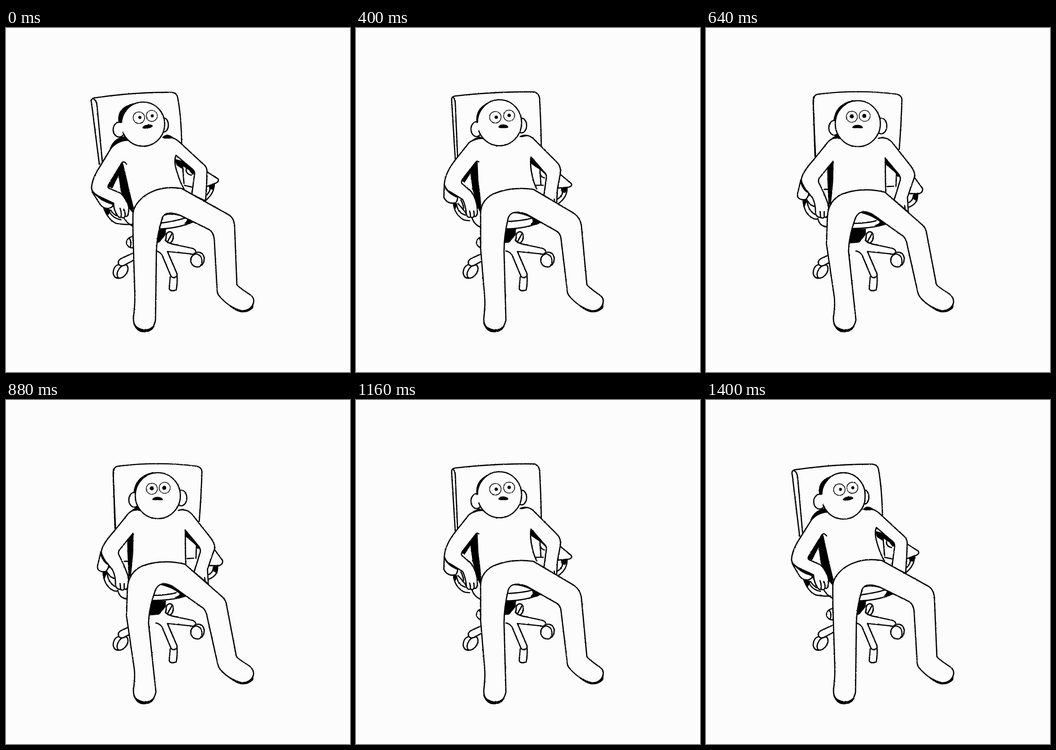
Write an HTML page that moves like this. It is 748 px wide and 748 px high and loops after 1520 ms.

```html
<!DOCTYPE html>
<html lang="en">
<head>
<meta charset="utf-8">
<title>Swivel chair</title>
<style>
html, body { margin: 0; width: 100%; height: 100%; overflow: hidden; background: #fcfcfc; }
svg { display: block; width: 100%; height: 100%; }
path { fill: #fcfcfc; stroke: #000; stroke-width: 2.7; stroke-linecap: round; stroke-linejoin: round; }
.line { fill: none; }
.ink { fill: #000; stroke-width: 1; }
.blank { stroke: none; }
.thin { stroke-width: 1.6; }
</style>
</head>
<body>
<svg viewBox="0 0 748 748">
  <filter id="rough" x="0" y="0" width="748" height="748" filterUnits="userSpaceOnUse" color-interpolation-filters="sRGB">
    <feTurbulence type="fractalNoise" baseFrequency=".35" numOctaves="2" seed="4"/>
    <feDisplacementMap in="SourceGraphic" scale="2.2" xChannelSelector="R" yChannelSelector="G"/>
  </filter>
  <g id="art" filter="url(#rough)"></g>
</svg>
<script>
const art = document.getElementById('art');
const moving = [];

// One path: a single outline stays still; three are poses turned left, halfway and front.
function part(style, ...poses) {
  const path = document.createElementNS('http://www.w3.org/2000/svg', 'path');
  path.setAttribute('class', style);
  path.setAttribute('d', poses[0]);
  art.append(path);
  if (poses.length > 1) {
    const values = poses.map(d => d.match(/-?[\d.]+/g).map(Number));
    moving.push({ path, values, shape: poses[0] });
  }
}

const oval = (x, y, rx, ry = rx) =>
  `M${x - rx} ${y} a${rx} ${ry} 0 1 0 ${2 * rx} 0 a${rx} ${ry} 0 1 0 ${-2 * rx} 0`;
const ovals = (style, ...poses) => part(style, ...poses.map(p => oval(...p)));

// Wheels and base
part('', 'M278 453 Q262 455 262 468 Q265 479 278 478 M268 457 Q274 465 270 477');
part('', 'M350 446 Q358 439 363 448 Q366 460 357 468 Q346 467 348 456 Q348 450 350 446 M361 447 L351 465');
part('ink', 'M313 437 L347 437 L347 449 Q341 457 333 466 L312 468 Z');
part('', 'M248 514 Q234 515 233 533 Q235 545 246 544 Q239 540 243 529 Q249 515 262 515 Q268 521 263 532 Q256 544 246 544');
part('', 'M279 488 L249 502 Q241 508 246 515 Q250 519 257 516 L279 504');
part('', 'M413 488 Q428 485 431 500 Q431 514 421 519 Q407 522 402 509 Q400 495 413 491 Q427 494 426 509 Q425 516 421 519');
part('', 'M357 541 L355 567 Q357 572 363 571 L370 570 Q373 556 372 539');
part('', 'M346 461 Q350 468 372 472 L405 479 Q414 482 412 488 Q408 494 401 491 L351 486 L370 530 Q375 539 368 542 Q361 545 358 538 L342 500 Q338 487 326 485');

// Chair back and seat
part('',
  'M203 297 L186 163 Q183 154 192 152 Q280 139 361 140 Q371 141 373 150 Q381 190 382 252',
  'M216 288 L208 158 Q207 149 215 148 Q300 138 388 139 Q398 143 399 152 Q402 200 403 260',
  'M237 280 L233 158 Q233 146 243 144 Q330 133 415 144 Q426 147 426 157 Q424 215 420 264');
part('line',
  'M190 154 Q197 157 198 170 L210 297',
  'M211 150 Q216 155 216 166 L221 283',
  'M235 151 Q233 156 233 164 L238 280');
part('',
  'M256 412 Q262 424 276 431 L330 437 Q375 436 408 421 L380 390 L280 380',
  'M252 412 Q256 426 270 433 L325 437 Q370 436 400 423 L370 390 L280 380',
  'M243 414 Q247 432 263 432 L316 436 Q360 436 392 426 L360 390 L280 380');
part('line',
  'M330 425 Q365 421 390 413',
  'M322 421 Q360 420 384 413',
  'M312 425 Q350 425 370 419');
part('ink',
  'M343 405 Q360 397 378 405 L411 420 Q398 426 388 425 Q396 418 394 414 Q362 400 343 408 Z',
  'M340 400 Q352 397 371 403 L401 423 Q392 430 380 427 Q388 421 382 413 Q362 402 340 402 Z',
  'M338 400 Q348 398 362 404 L393 426 Q380 430 368 429 Q379 425 378 421 Q362 408 338 402 Z');

// Right armrest
part('line',
  'M453 338 Q453 360 434 375 M445 343 Q444 358 434 365',
  'M459 348 Q459 370 438 383 M450 351 Q450 366 438 372',
  'M460 361 Q462 382 440 390 M451 364 Q450 376 440 380');
part('ink',
  'M441 341 L454 337 L450 351 L443 350 Z',
  'M446 348 L460 346 L455 358 L448 357 Z',
  'M451 362 L461 360 L459 377 L452 372 Z');
part('',
  'M436 312 L461 328 Q464 333 457 337 L436 345',
  'M444 318 L468 338 Q471 344 463 346 L440 348',
  'M454 326 L471 349 Q472 357 464 360 L440 360');

// Left armrest
part('line',
  'M212 390 Q222 418 240 425 Q258 428 274 427 M224 398 Q232 414 250 417',
  'M212 382 Q214 405 234 417 Q240 419 247 419 M219 385 Q222 402 238 407',
  'M211 375 Q213 405 235 415 Q239 416 243 415 M220 378 Q223 398 238 406');
part('ink',
  'M211 388 L228 396 L221 409 Z',
  'M211 381 L220 382 L215 396 Z',
  'M211 374 L221 373 L214 388 Z');
part('line',
  'M232 386 Q238 392 240 404 M228 396 Q232 404 240 408',
  'M228 374 Q232 380 234 392 M222 382 Q230 390 240 404',
  'M224 364 Q231 362 236 376 M221 376 Q228 388 238 388');
part('',
  'M187 356 L205 384 Q213 394 224 392 Q234 390 233 380 Q205 372 187 356',
  'M192 342 L191 368 Q198 384 217 380 Q224 371 218 362 Q200 356 192 342',
  'M206 331 L199 360 Q197 375 217 373 Q226 363 222 354 Q210 345 206 331');
part('ink',
  'M186 353 Q205 370 234 380 L232 384 Q203 377 186 353',
  'M191 342 Q197 355 222 366 L219 368 Q197 360 191 342',
  'M205 330 Q208 342 222 357 L220 358 Q206 348 205 330');

// Gaps between arms and torso
part('line',
  'M240 362 L248 362',
  'M238 360 L250 360',
  'M257 351 L265 351');
part('ink',
  'M251 293 L222 345 L231 348 L245 320 L250 355 L264 388 L276 402 L275 380 L264 330 Z',
  'M262 290 L229 331 L236 336 L249 315 L254 352 L266 392 L272 405 L271 370 L265 330 Z',
  'M276 290 L264 303 L264 304 L264 315 L265 345 L266 370 L267 386 L272 372 L275 330 Z');
part('line',
  'M384 302 L387 338 M387 342 L404 346 M392 306 Q390 317 403 320',
  'M400 310 L402 340 M391 342 L407 342 M402 320 Q404 325 410 326',
  'M414 318 L413 344 M393 345 L408 344 M414 320 Q416 322 420 322');
part('ink',
  'M366 285 L385 290 L411 311 L406 319 L398 309 L385 300 L385 307 L371 298 Z',
  'M379 283 L396 295 L414 316 L414 321 L404 311 L398 307 L394 304 L381 295 Z',
  'M389 283 L405 301 L423 320 L423 326 L414 317 L408 311 L402 306 L390 296 Z');

// Torso
part('blank',
  'M253 293 L279 395 L392 356 L368 290 L375 246 L345 238 L266 244 L228 262',
  'M263 290 L272 390 L393 352 L380 290 L385 240 L357 236 L276 240 L246 249',
  'M276 290 L271 385 L391 358 L390 285 L405 249 L375 240 L290 240 L265 248');
part('line',
  'M253 293 L263 335 Q269 368 277 392 M370 276 Q364 288 371 310 Q378 335 387 350',
  'M263 290 L265 335 Q269 360 271 385 M381 279 Q378 290 381 310 Q385 335 393 350',
  'M276 290 L275 335 Q273 360 270 385 M390 283 Q390 295 390 310 Q390 340 391 357');

// Arms and fingers
part('',
  'M266 244 Q243 244 228 262 L202 305 Q186 330 186 349 Q187 357 200 365 L234 381 Q234 396 242 407 Q246 414 250 411 Q256 415 259 409 Q265 412 266 402 Q269 390 264 380 Q255 364 249 359 L225 349 Q220 347 223 341 L252 293 Q257 288 262 296',
  'M276 240 Q258 240 246 249 L215 288 Q194 315 192 340 Q195 352 206 357 L232 373 Q238 385 240 404 Q242 414 249 411 Q254 414 257 409 Q262 412 264 402 Q264 385 260 374 Q253 355 244 350 L230 338 Q228 334 232 328 L261 291 Q263 288 267 291',
  'M290 240 Q275 236 265 248 L236 284 Q211 312 208 326 Q205 332 214 347 L232 370 Q239 385 238 403 Q241 412 249 412 Q255 415 257 411 Q264 414 266 402 Q268 388 263 376 Q258 362 252 350 L245 336 Q243 330 248 324 L276 290 Q276 289 276 290');
part('',
  'M345 238 Q360 234 375 246 L428 295 Q438 302 437 314 L436 345 L434 376 L404 362 L410 318 Q411 310 402 304 L370 277',
  'M357 236 Q372 229 385 240 L437 292 Q447 302 444 318 L438 350 L436 386 L408 368 L414 325 Q415 317 407 311 L381 281',
  'M375 240 Q392 235 405 249 L446 301 Q456 315 453 325 L438 368 L440 400 L409 374 L421 335 Q425 326 419 318 L390 283');
part('line',
  'M248 392 Q252 402 250 411 M256 394 Q260 402 259 408 M426 376 L427 380',
  'M247 398 Q249 404 249 410 M256 398 Q257 404 257 408 M431 372 L432 380',
  'M248 399 Q249 405 249 411 M257 400 Q257 405 257 410 M432 386 L433 394');

// Legs and soles
part('',
  'M276 405 Q277 385 300 366 Q335 341 382 349 L484 406 Q496 413 497 431 L502 558 Q506 564 531 580 Q541 587 538 598 Q533 614 514 615 Q486 609 464 583 Q459 578 459 568 L453 462 Q452 444 441 438 L378 407 Q345 396 340 413 Q327 455 327 490 L325 635 Q322 656 302 657 Q276 655 277 630 Q281 600 280 575 L276 440 Z',
  'M271 405 Q270 375 300 360 Q340 344 386 351 L474 403 Q487 412 490 429 L502 558 Q506 564 529 580 Q540 587 537 598 Q533 614 514 615 Q486 609 464 583 Q459 578 459 568 L446 460 Q445 445 433 440 L371 405 Q338 393 331 413 Q321 455 322 490 L326 635 Q322 656 302 658 Q276 655 278 630 Q282 600 279 575 L271 480 Z',
  'M264 410 Q266 375 296 361 Q340 345 389 357 L468 426 Q477 433 479 442 L501 558 Q506 564 529 578 Q540 587 538 598 Q533 614 514 615 Q486 609 466 586 Q461 580 459 568 L436 465 Q432 453 425 450 L362 405 Q335 391 325 413 Q311 450 310 485 L326 635 Q322 656 302 658 Q276 655 277 630 Q281 605 279 585 L262 470 Z');
part('ink', 'M487 605 Q515 629 537 609 L538 598 Q533 614 514 615 Q498 611 487 605 Z');
part('ink', 'M277 641 Q283 663 303 661 Q318 660 323 648 Q314 657 302 656 Q284 654 277 641 Z');

// Head
part('ink',
  'M226 262 Q235 238 258 236 L266 244 Q243 244 228 262 Z',
  'M246 249 Q256 240 268 236 L276 240 Q258 241 246 250 Z',
  'M270 244 Q276 237 285 232 L294 241 Q276 237 270 245 Z');
part('ink',
  'M340 238 Q350 227 363 238 L356 240 L345 240 Z',
  'M357 236 Q364 231 374 234 L370 235 L360 237 Z',
  'M374 240 Q380 237 386 237 L384 238 L376 240 Z');
part('ink',
  'M246 208 Q242 195 248 182 Q256 169 277 164 L290 200 Z',
  'M263 208 Q259 190 269 176 Q280 162 304 157 L310 200 Z',
  'M277 206 Q278 190 285 178 Q296 162 320 157 L325 200 Z');
ovals('', [246, 221, 13, 16], [262, 220, 12, 16], [279, 217, 12, 16]);
ovals('', [344, 211, 9, 15], [360, 212, 11, 16], [381, 213, 12, 17]);
ovals('', [298, 209, 47, 48], [312, 206, 48, 50], [330, 208, 49, 50]);
ovals('blank', [251, 217, 5, 11], [265, 215, 4, 9], [280, 215, 0, 0]);

// Face
ovals('thin', [289, 195, 12.5], [303, 194, 12.5], [317, 193, 12]);
ovals('thin', [317, 191, 12], [333, 190.5, 12], [345, 191, 12]);
ovals('ink', [291, 194.5, 3], [305, 194, 3.3], [317, 192, 4]);
ovals('ink', [318, 191, 3], [333, 190, 3.3], [344, 191, 4]);
part('ink',
  'M297 217 Q298 212 307 211 Q317 209 319 213 Q316 217 307 218 Q298 219 297 217',
  'M310 215 Q312 210 320 210 Q331 211 331 216 Q326 218 320 217 Q310 218 310 215',
  'M318 216 Q321 211 330 211 Q340 212 341 217 Q335 218 330 217 Q320 218 318 216');

const LOOP = 1520;
const starts = [0, 120, 240, 320, 400, 480, 560, 640, 760];
const MID = 0.5, FRONT = 0.96;
let shown = -1;

function pose(step) {
  const p = (1 - Math.cos(Math.PI * step / 8)) / 2;
  // Quadratic blend through the three poses
  const mid = p * (p - FRONT) / (MID * (MID - FRONT));
  const front = p * (p - MID) / (FRONT * (FRONT - MID));
  const left = 1 - mid - front;
  for (const { path, values: [a, b, c], shape } of moving) {
    let i = 0;
    path.setAttribute('d', shape.replace(/-?[\d.]+/g, () => {
      const value = a[i] * left + b[i] * mid + c[i] * front;
      i++;
      return +value.toFixed(1);
    }));
  }
}

function tick() {
  const t = performance.now() % LOOP;
  const swing = t < 880 ? t : 1639.99 - t;
  const step = starts.findLastIndex(start => swing >= start);
  if (step !== shown) pose(shown = step);
  requestAnimationFrame(tick);
}
tick();
</script>
</body>
</html>
```
